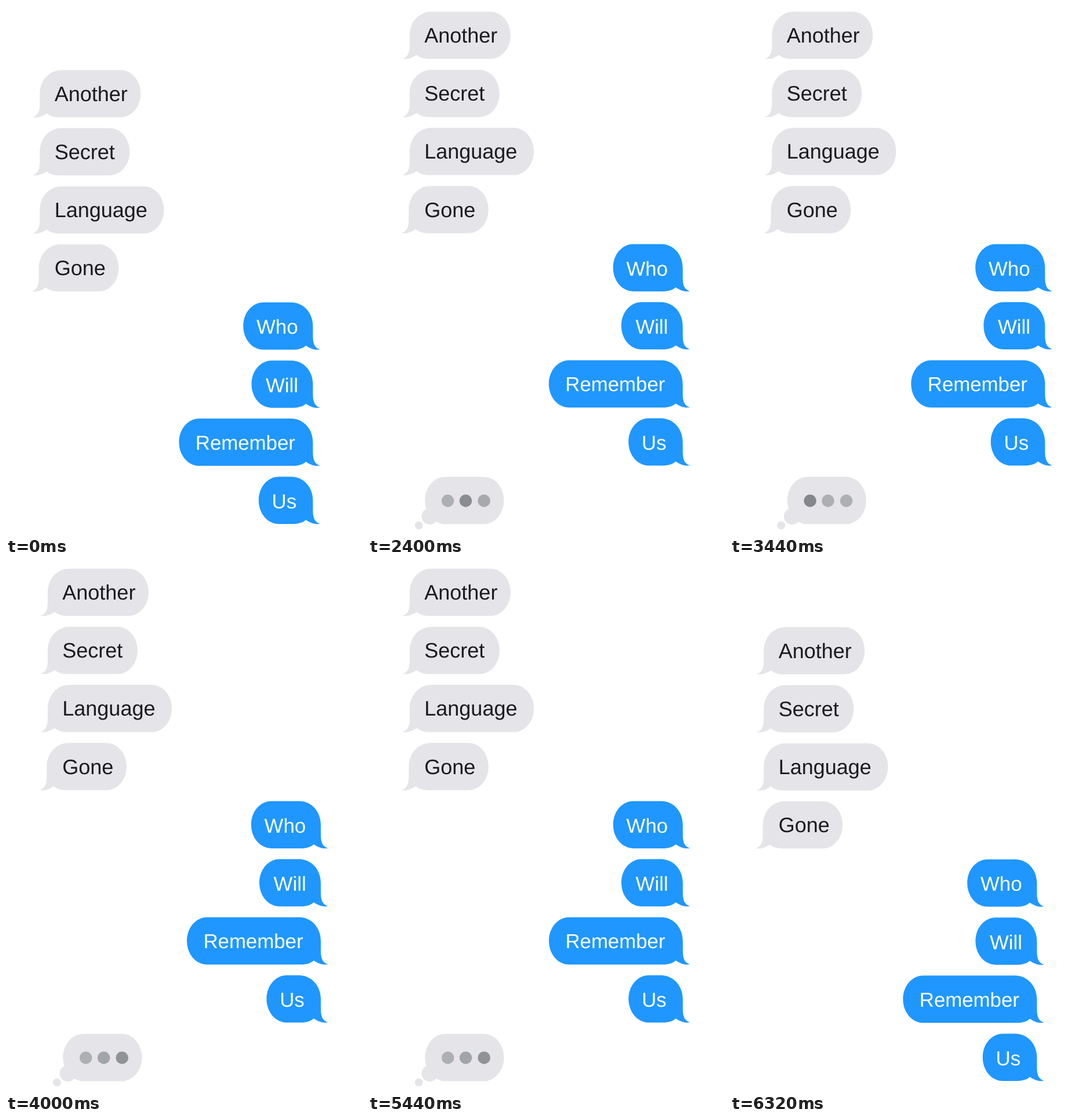
These frames come from a looping animation (614x912 px, 8320 ms). An HTML page:

```html
<!DOCTYPE html>
<html lang="en">
<head>
<meta charset="utf-8">
<style>
  html, body { margin: 0; width: 100%; height: 100%; overflow: hidden; background: #fff; }
  svg { display: block; width: 614px; height: 912px; font-family: "Liberation Sans", Arial, sans-serif; }
  text { text-rendering: geometricPrecision; }
</style>
</head>
<body>
<svg viewBox="0 0 614 912"><g id="chat"></g></svg>
<script>
const LOOP = 8320, TYPING_START = 2000, TYPING_END = 6320, STEP = 80;
const SHIFT_X = 14, SHIFT_Y = -100.6;
const GREY = '#e5e4e9', BLUE = '#1f97ff', INK = '#1b1a1e';
const DARK = [131, 135, 139], LIGHT = [173, 176, 179];
const chat = document.getElementById('chat');

function add(parent, name, attrs, text = '') {
  const el = document.createElementNS('http://www.w3.org/2000/svg', name);
  for (const key in attrs) el.setAttribute(key, attrs[key]);
  el.textContent = text;
  return parent.appendChild(el);
}

// near: edge with the tail, far: opposite edge
function bubblePath(near, far, y) {
  const s = Math.sign(far - near);
  const n = (dx, dy) => `${near + s * dx},${y + dy} `;
  const f = (dx, dy) => `${far - s * dx},${y + dy} `;
  return 'M' + n(38, 0) + 'L' + f(35, 0) +
    'C' + f(15.5, 0) + f(0, 18) + f(0, 40.7) +
    'S' + f(15.5, 81.5) + f(35, 81.5) + 'L' + n(34, 81.5) +
    'C' + n(25, 81.5) + n(17, 79) + n(12, 74.5) +
    'C' + n(5, 79.5) + n(-4, 83) + n(-12.3, 81) +
    'C' + n(-4, 79) + n(0, 72) + n(0, 58) + 'L' + n(0, 41) +
    'C' + n(0, 18) + n(16, 0) + n(38, 0) + 'Z';
}

// word, tail edge, far edge, text x, baseline below bubble top
[
  ['Another', 58.3, 232.3, 83.7, 53.4],
  ['Secret', 58.3, 213.3, 83.7, 53.4],
  ['Language', 58.3, 272.5, 83.7, 53.4],
  ['Gone', 56.7, 194.3, 83.7, 53.4],
  ['Who', 529.3, 409.2, 432, 54.4],
  ['Will', 529.3, 423.4, 448, 54.4],
  ['Remember', 529.3, 298.4, 326.8, 53.4],
  ['Us', 529.3, 435.8, 458.6, 54.6]
].forEach(([word, near, far, x, base], i) => {
  const y = 110.4 + i * 100.15, sent = near > far;
  add(chat, 'path', { d: bubblePath(near, far, y), fill: sent ? BLUE : GREY });
  add(chat, 'text', { x, y: y + base, 'font-size': sent ? 34.8 : 36, fill: sent ? '#fff' : INK }, word);
});

const typing = add(chat, 'g', { fill: GREY, transform: `translate(${-SHIFT_X} ${-SHIFT_Y})` });
add(typing, 'rect', { x: 98.6, y: 811.7, width: 136.4, height: 81.6, rx: 35, ry: 40.8 });
add(typing, 'circle', { cx: 107, cy: 880, r: 14 });
add(typing, 'circle', { cx: 88.3, cy: 895.4, r: 7 });
const dots = [138.1, 169, 200.6].map(cx => add(typing, 'circle', { cx, cy: 853, r: 10.7 }));

function draw(t) {
  const active = t >= TYPING_START && t < TYPING_END;
  typing.style.display = active ? '' : 'none';
  if (!active) {
    chat.setAttribute('transform', 'translate(0 0)');
    return;
  }
  // nine ticks per sweep, the fourth pose lasts two of them
  const tick = Math.floor((t - TYPING_START) / STEP) % 9;
  const pose = tick > 3 ? tick - 1 : tick;
  const drift = pose ? 0.76 - 0.06 * pose : 0;
  chat.setAttribute('transform', `translate(${SHIFT_X - drift} ${SHIFT_Y})`);
  const focus = pose * 2 / 7;
  dots.forEach((dot, i) => {
    const k = Math.max(0, 1 - Math.abs(focus - i));
    dot.setAttribute('fill', `rgb(${LIGHT.map((c, j) => Math.round(c + (DARK[j] - c) * k))})`);
  });
}

const start = performance.now();
function frame() {
  draw((performance.now() - start) % LOOP);
  requestAnimationFrame(frame);
}
frame();
</script>
</body>
</html>
```
